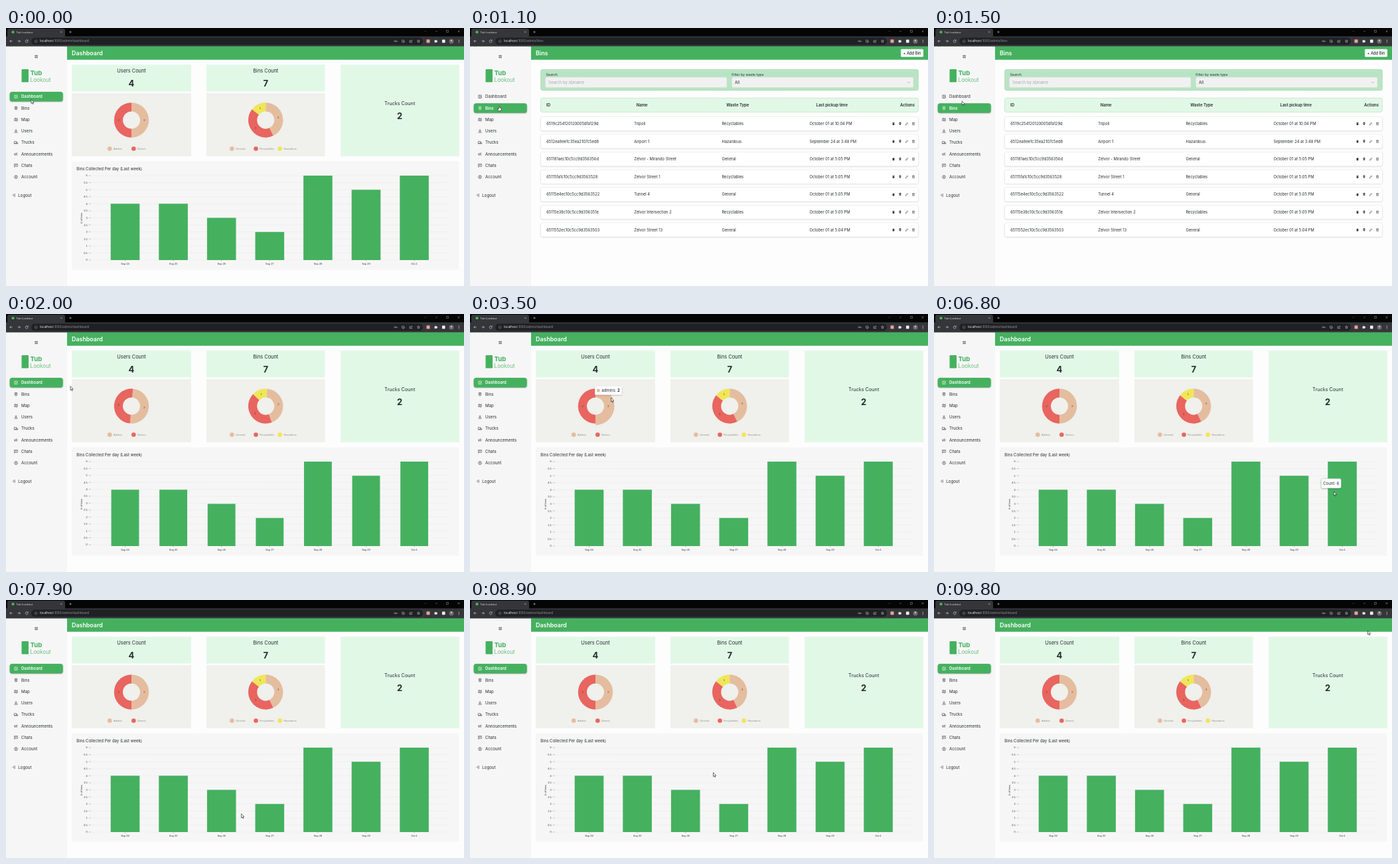
These frames come from a looping animation (690x388 px, 9900 ms). An HTML page with a canvas:

```html
<!DOCTYPE html>
<html lang="en">
<head>
<meta charset="utf-8">
<title>Tub Lookout</title>
<style>
  html, body { margin: 0; width: 100%; height: 100%; overflow: hidden; background: #fdfdfd; }
  canvas { display: block; width: 690px; height: 388px; }
</style>
</head>
<body>
<canvas id="stage"></canvas>
<script>
const canvas = document.getElementById('stage');
const ctx = canvas.getContext('2d');
const ratio = window.devicePixelRatio || 1;
canvas.width = 690 * ratio;
canvas.height = 388 * ratio;

const LOOP = 9900, STEP = 100, OPEN_BINS = 1000, OPEN_DASHBOARD = 1700;
const GREEN = '#45b15f', MINT = '#e2f8e7', INK = '#262b2f';
const TAN = '#e4bd9f', RED = '#e86560', YELLOW = '#f0e657';
const UI = 'Inter, sans-serif', PLAIN = '"Liberation Sans", Arial, sans-serif', CHROME = '"Open Sans", sans-serif';

const clamp = (v, lo = 0, hi = 1) => Math.min(hi, Math.max(lo, v));
const smooth = u => u * u * (3 - 2 * u);

// Icons on a 24-unit grid
const ICONS = {
  dashboard: 'M3 3h18v18H3z M11 3v18 M11 12h10',
  bins: 'M3 6h18 M8 6V3h8v3 M5 6l1 15h12l1-15 M10 10v7 M14 10v7',
  map: 'M3 5l6-2 6 3 6-2v15l-6 2-6-3-6 2z M9 3v15 M15 6v15',
  users: 'M12 4a4 4 0 1 0 .1 0z M4 21v-2q0-5 8-5t8 5v2z',
  trucks: 'M1 5h13v12H1z M14 9h5l4 4v4h-9 M6 16a2.5 2.5 0 1 0 .1 0z M18 16a2.5 2.5 0 1 0 .1 0z',
  announcements: 'M2 10v5h4l8 4V6l-8 4z M6 15v6 M18 12h5 M17 7l4-3 M17 17l4 3',
  chats: 'M2 3h20v15H7l-5 4z M6 8h12 M6 13h9',
  account: 'M12 2a10 10 0 1 0 .1 0z M12 6a3 3 0 1 0 .1 0z M6 19q1-4 6-4t6 4',
  logout: 'M12 3H21v18H12 M2 12h13 M10 7l5 5-5 5',
  pin: 'M12 1C2 1 3 11 12 23C21 11 22 1 12 1z M12 6a3 3 0 1 1-.1 0z',
  pencil: 'M3 21l1-5L17 3l4 4L8 20z',
  can: 'M4 5h16v3H4z M5 9h14l-1 13H6z M9 2h6v3H9z',
  back: 'M21 12H3 M11 4l-8 8 8 8',
  forward: 'M3 12h18 M13 4l8 8-8 8',
  reload: 'M20 8a9 9 0 1 0 1 6 M21 2v7h-7',
  info: 'M12 2a10 10 0 1 0 .1 0z M12 11v6 M12 7v1',
  key: 'M7 7a5 5 0 1 0 .1 0z M12 12h11v5 M18 12v4',
  install: 'M12 4H3v14h18v-5 M17 2v9 M13 8l4 4 4-4 M8 22h8',
  share: 'M9 7H3v14h17v-6 M8 16q1-9 12-9 M16 2l5 5-5 5',
  star: 'M12 2l3 7h7l-6 5 2 8-6-5-6 5 2-8-6-5h7z',
  puzzle: 'M3 7h6a3 3 0 1 1 6 0h5v5a3 3 0 1 1 0 5v5H3z',
  down: 'M4 8l8 8 8-8',
  cross: 'M4 4l16 16 M20 4L4 20',
  plus: 'M12 3v18 M3 12h18',
  minus: 'M3 12h18',
  square: 'M4 4h16v16H4z',
  menu: 'M2 5h20 M2 12h20 M2 19h20'
};

function icon(name, x, y, size, color, { fill = false, weight = 2 } = {}) {
  ctx.save();
  ctx.translate(x - size / 2, y - size / 2);
  ctx.scale(size / 24, size / 24);
  const shape = new Path2D(ICONS[name]);
  ctx.fillStyle = ctx.strokeStyle = color;
  ctx.lineWidth = weight;
  fill ? ctx.fill(shape, 'evenodd') : ctx.stroke(shape);
  ctx.restore();
}

function text(str, x, y, size, { color = INK, weight = 400, font = UI, align = 'left' } = {}) {
  ctx.font = `${weight} ${size}px ${font}`;
  ctx.fillStyle = color;
  ctx.textAlign = align;
  ctx.textBaseline = 'alphabetic';
  // y is the middle of the capitals
  ctx.fillText(str, x, y + size * 0.36);
  return ctx.measureText(str).width;
}

function box(x, y, w, h, fill, { r = 0, border, shadow } = {}) {
  ctx.save();
  ctx.beginPath();
  ctx.roundRect(x, y, w, h, r);
  if (shadow) {
    ctx.shadowColor = shadow;
    ctx.shadowBlur = 2 * ratio;
    ctx.shadowOffsetY = 0.7 * ratio;
  }
  ctx.fillStyle = fill;
  ctx.fill();
  ctx.shadowColor = 'transparent';
  if (border) {
    ctx.strokeStyle = border;
    ctx.lineWidth = 0.5;
    ctx.stroke();
  }
  ctx.restore();
}

function dot(x, y, r, fill) {
  ctx.beginPath();
  ctx.arc(x, y, r, 0, Math.PI * 2);
  ctx.fillStyle = fill;
  ctx.fill();
}

function line(x1, y1, x2, y2, color, width = 0.4) {
  ctx.beginPath();
  ctx.moveTo(x1, y1);
  ctx.lineTo(x2, y2);
  ctx.strokeStyle = color;
  ctx.lineWidth = width;
  ctx.stroke();
}

function drawBrowser(page) {
  box(0, 0, 690, 14, '#050505');
  box(2, 1, 87, 14, '#35363a', { r: 3 });
  box(0, 12.5, 690, 15, '#35363a');
  dot(10.5, 6.2, 2.1, GREEN);
  text('Tub Lookout', 15.5, 6.2, 4.3, { color: '#e4e6e8', font: CHROME });
  icon('cross', 83.3, 6, 3.4, '#ddd', { weight: 3 });
  icon('plus', 97, 6, 4.4, '#ddd', { weight: 3 });
  icon('down', 632, 5, 3.5, '#ddd');
  icon('minus', 648.5, 5, 4, '#ddd');
  icon('square', 665, 5, 4.4, '#ddd');
  icon('cross', 682, 5, 4.4, '#ddd');

  box(38, 14.6, 590, 10.6, '#202124', { r: 5.3 });
  ['back', 'forward', 'reload'].forEach((name, i) => icon(name, 7.8 + i * 11.7, 19.8, 5.2, '#e8eaed', { weight: 2.6 }));
  icon('info', 45.2, 19.9, 4.6, '#c5c8cb');
  const w = text('localhost', 51, 19.7, 4.8, { color: '#f1f3f4', font: CHROME });
  text(`:3000/admin/${page}`, 51 + w, 19.7, 4.8, { color: '#94999e', font: CHROME });
  ['key', 'install', 'share', 'star'].forEach((name, i) => icon(name, 587 + i * 11.5, 19.8, 5, '#d8dadd', { weight: 2.4 }));
  box(633.5, 17.3, 5, 5, '#e8a49b');
  icon('puzzle', 647.5, 19.5, 5.2, '#f1f3f4', { fill: true });
  box(657, 17.4, 4.6, 4.8, '#f1f3f4', { r: 0.6 });
  dot(671, 19.9, 3.5, '#716b6e');
  dot(671, 18.9, 1.2, '#c9c2c2');
  for (let i = -1; i < 2; i++) dot(682.3, 19.9 + i * 1.8, 0.55, '#e8eaed');
}

function drawSidebar(page) {
  box(0, 27.5, 92, 360.5, '#f6f6f6');
  icon('menu', 45.6, 43, 5.6, '#222', { weight: 2.8 });
  box(23.5, 62, 10.5, 19.5, GREEN, { r: 1 });
  text('Tub', 36.5, 67.3, 9.6, { color: GREEN, weight: 700 });
  text('Lookout', 36.5, 77.6, 8.3, { color: GREEN, weight: 300 });
  ['Dashboard', 'Bins', 'Map', 'Users', 'Trucks', 'Announcements', 'Chats', 'Account'].forEach((label, i) => {
    const y = 103.2 + i * 17.26, name = label.toLowerCase(), on = name === page;
    if (on) box(5.7, y - 7.2, 80, 14.4, GREEN, { r: 3.5, shadow: 'rgba(0,0,0,.35)' });
    const color = on ? '#fff' : INK;
    icon(name, 15, y, 6, color);
    text(label, 23, y, on ? 6 : 6.15, { color, weight: on ? 600 : 400 });
  });
  icon('logout', 11.6, 251.5, 5, INK);
  text('Logout', 18.3, 251.5, 6.1);
}

function drawHeader(title) {
  box(92, 27.5, 598, 360.5, '#fdfdfd');
  box(92, 27.3, 598, 20.5, GREEN);
  text(title, 99, 37.8, 8.9, { color: '#fff', weight: 600 });
}

const BASE = 349, UNIT = 127 / 6;
const bars = [4, 4, 3, 2, 6, 5, 6].map((count, i) => ({ count, x: 179.5 + i * 72.6, day: i < 6 ? `Sep ${24 + i + (i > 4 ? 0 : 0)}` : 'Oct 1' }));
const pies = [
  { x: 189, y: 138.5, legend: 156.2, slices: [['admins', 2, TAN], ['drivers', 2, RED]] },
  { x: 391.2, y: 138.5, legend: 340.4, slices: [['general', 3, TAN], ['recyclables', 3, RED], ['hazardous', 1, YELLOW]] }
];
const capital = s => s[0].toUpperCase() + s.slice(1);

function layout(pie) {
  const total = pie.slices.reduce((sum, s) => sum + s[1], 0);
  let from = 0;
  return pie.slices.map(([name, count, color]) => {
    const start = from;
    from += count / total * Math.PI * 2;
    return { name, count, color, start, end: from };
  });
}

function drawPie(pie, pointer, turn) {
  const dx = pointer.x - pie.x, dy = pointer.y - pie.y, reach = Math.hypot(dx, dy);
  const angle = (Math.atan2(dx, -dy) + Math.PI * 2) % (Math.PI * 2);
  let hovered = null;
  layout(pie).forEach((s, i) => {
    const over = reach > 13 && reach < 28.5 && angle >= s.start && angle < s.end;
    if (over) hovered = s;
    const a = s.start + turn - Math.PI / 2, b = s.end + turn - Math.PI / 2, mid = (a + b) / 2;
    ctx.beginPath();
    ctx.arc(pie.x, pie.y, over ? 28.5 : 26.2, a, b);
    ctx.arc(pie.x, pie.y, 13, b, a, true);
    ctx.fillStyle = s.color;
    ctx.fill();
    text(s.count, pie.x + Math.cos(mid) * 19.4, pie.y + Math.sin(mid) * 19.4, 4, { color: '#493a34', font: PLAIN, align: 'center' });
    const lx = pie.legend + i * 36.1;
    dot(lx, 181.5, 3.3, s.color);
    text(capital(s.name), lx + 5.8, 181.5, 4, { color: '#8d8d8d', font: PLAIN });
  });
  return hovered;
}

function tooltip(pointer, label, value, swatch) {
  const size = 6;
  ctx.font = `400 ${size}px ${UI}`;
  const inner = ctx.measureText(label + value).width + (swatch ? 7 : 0);
  const w = inner + 6, x = pointer.x - 4 - w / 2, y = pointer.y - (swatch ? 17.5 : 19.5);
  box(x, y, w, swatch ? 13 : 14.5, '#fff', { r: swatch ? 1 : 2.2, border: swatch ? '#eee' : '#8fcb9e', shadow: 'rgba(0,0,0,.3)' });
  const mid = y + (swatch ? 6.5 : 7.2);
  let tx = x + 3;
  if (swatch) {
    box(tx, mid - 2.2, 4.4, 4.4, swatch);
    tx += 7;
  }
  tx += text(label, tx, mid, size);
  text(value, tx, mid, size, { weight: swatch ? 700 : 400 });
}

function drawDashboard(t, pointer) {
  const fresh = t >= OPEN_DASHBOARD;
  const grow = fresh ? 1 - (1 - clamp((t - OPEN_DASHBOARD) / 300)) ** 3 : 1;
  const unsettled = fresh ? clamp((2500 - t) / 500) : 0;

  drawHeader('Dashboard');
  [['Users Count', 4, 99, 180], ['Bins Count', 7, 302, 178.5]].forEach(([label, n, x, w]) => {
    box(x, 55, w, 40.6, MINT);
    box(x, 98, w, 95, '#f0f0ec');
    text(label, x + w / 2, 64.5, 7.4, { align: 'center' });
    text(n, x + w / 2, 83.8, 13, { weight: 700, align: 'center' });
  });
  box(504, 55, 179, 138, MINT);
  text('Trucks Count', 593.2, 113.5, 7.3, { align: 'center' });
  text(2, 593.2, 132.5, 13, { weight: 700, align: 'center' });

  const slice = pies.map(pie => drawPie(pie, pointer, unsettled * 0.087)).find(Boolean);

  box(99, 200.5, 583.5, 163, '#f6f6f6');
  text('Bins Collected Per day (Last week)', 106.3, 211.8, 6);
  for (let v = 0; v <= 6; v += 0.5) {
    const y = BASE - 127 + (6 - v) * UNIT * (1 - 0.016 * unsettled);
    line(129, y, 666, y, '#e3e3e3');
    line(124.5, y, 127.8, y, '#777');
    text(v, 122.8, y, 3.95, { color: '#333', font: PLAIN, align: 'right' });
  }
  ctx.save();
  ctx.translate(113.6, 286);
  ctx.rotate(-Math.PI / 2);
  text('# of bins', 0, 0, 4.3, { color: '#333', font: PLAIN, align: 'center' });
  ctx.restore();

  const width = 43.6 * (1 - 0.04 * unsettled);
  let bar = null;
  bars.forEach(b => {
    const h = b.count * UNIT * grow;
    box(b.x - width / 2, BASE - h, width, h, GREEN);
    line(b.x, BASE, b.x, BASE + 1.8, '#777');
    text(b.day, b.x, 355, 3.95, { color: '#333', font: PLAIN, align: 'center' });
    if (Math.abs(pointer.x - b.x) < width / 2 && pointer.y < BASE && pointer.y > BASE - h) bar = b;
  });
  if (slice) tooltip(pointer, `${slice.name}: `, slice.count, slice.color);
  if (bar) tooltip(pointer, 'Count: ', bar.count);
}

const records = [
  ['6519c254f20120005dfa129d', 'Tripoli', 'Recyclables', 'October 01 at 10:04 PM'],
  ['6512ea9ee1c35ea2107c5ed8', 'Airport 1', 'Hazardous', 'September 24 at 3:48 PM'],
  ['651181aec10c5cc9d356356d', 'Zelvor - Mirando Street', 'General', 'October 01 at 5:05 PM'],
  ['65115fa1c10c5cc9d3563528', 'Zelvor Street 1', 'Recyclables', 'October 01 at 5:05 PM'],
  ['65115e4ec10c5cc9d3563522', 'Tunnel 4', 'General', 'October 01 at 5:05 PM'],
  ['65115e38c10c5cc9d356351e', 'Zelvor Intersection 2', 'Recyclables', 'October 01 at 5:05 PM'],
  ['6511552ec10c5cc9d3563503', 'Zelvor Street 13', 'General', 'October 01 at 5:04 PM']
];

function drawBins() {
  drawHeader('Bins');
  box(649, 31.8, 34, 11.8, '#fff', { r: 1.5 });
  text('+ Add Bin', 666, 37.7, 5.8, { weight: 500, align: 'center' });

  box(106.5, 62.3, 569, 31.6, '#b9e4c4', { r: 3, border: '#9fd4ad' });
  text('Search', 114.5, 70.3, 5.2);
  text('Filter by waste type', 394.3, 70.5, 5.2);
  box(113.5, 74, 273.5, 15.6, '#f1f1f1', { r: 2, border: '#d3dcd5' });
  box(394.5, 74, 273.5, 15.6, '#f1f1f1', { r: 2, border: '#d3dcd5' });
  text('Search by id/name', 118, 82, 6.1, { color: '#a4a9ad' });
  text('All', 399, 81.8, 6);
  icon('down', 661, 81.8, 4.6, '#444');

  box(106.5, 105.3, 569, 21.2, MINT, { r: 2.5, border: '#a9d9b5' });
  [['ID', 115], ['Name', 250.7], ['Waste Type', 386.3], ['Last pickup time', 521.5], ['Actions', 648]]
    .forEach(([label, x]) => text(label, x, 115.8, 6, { weight: 600 }));

  records.forEach((record, i) => {
    const y = 144 + i * 26.6;
    box(106.5, y - 10.6, 569, 21.2, '#fff', { r: 2.5, border: '#e2e4e2', shadow: 'rgba(0,0,0,.16)' });
    record.forEach((cell, col) => text(cell, 115.2 + col * 132.1, y, 5.8));
    icon('can', 638, y, 4.8, INK, { fill: true });
    icon('pin', 648, y, 5, INK, { fill: true });
    icon('pencil', 658, y, 4.8, INK, { weight: 2.6 });
    icon('bins', 668, y, 5.2, INK);
  });
}

// time, x, y of the pointer tip
const track = [
  [0, 38, 107.5], [700, 44, 117.5], [1300, 44, 117.5], [1650, 41, 105], [2000, 97, 108.5],
  [2300, 113, 114], [3300, 212.5, 126], [3700, 212.5, 126], [4300, 172, 146], [5300, 402, 153],
  [5700, 404, 121], [6300, 503, 247], [6700, 602.3, 267], [6900, 602.3, 267], [7300, 484, 308],
  [7800, 370, 324], [8300, 222, 300], [8500, 165, 299], [8900, 366.5, 259.5], [9400, 653.5, 46], [9900, 653.5, 46]
];

function pointerAt(t) {
  const i = track.findIndex((p, n) => n && t < p[0]);
  const [t0, x0, y0] = track[i - 1], [t1, x1, y1] = track[i];
  const u = smooth((t - t0) / (t1 - t0));
  return { x: x0 + (x1 - x0) * u, y: y0 + (y1 - y0) * u };
}

const ARROW = new Path2D('M0 0V6L1.4 4.8L2.4 7L3.3 6.6L2.4 4.4L4.2 4.3Z');
const HAND = new Path2D('M-.8 0Q0-.9.7 0V2.4L3.2 3V5.2L2.3 7.2H-1.2L-2.7 4.2L-2 3.6L-.8 4.6Z');

function drawPointer({ x, y }) {
  const shape = x < 86 && y > 112 ? HAND : ARROW;
  ctx.save();
  ctx.translate(x, y);
  ctx.fillStyle = '#fff';
  ctx.strokeStyle = '#111';
  ctx.lineWidth = 0.6;
  ctx.fill(shape);
  ctx.stroke(shape);
  ctx.restore();
}

function render(t) {
  ctx.setTransform(ratio, 0, 0, ratio, 0, 0);
  const page = t >= OPEN_BINS && t < OPEN_DASHBOARD ? 'bins' : 'dashboard';
  const pointer = pointerAt(t);
  if (page === 'bins') drawBins();
  else drawDashboard(t, pointer);
  drawSidebar(page);
  drawBrowser(page);
  drawPointer(pointer);
}

const began = performance.now();
function tick() {
  const t = (performance.now() - began) % LOOP;
  render(Math.floor(t / STEP) * STEP);
  requestAnimationFrame(tick);
}
tick();
</script>
</body>
</html>
```
